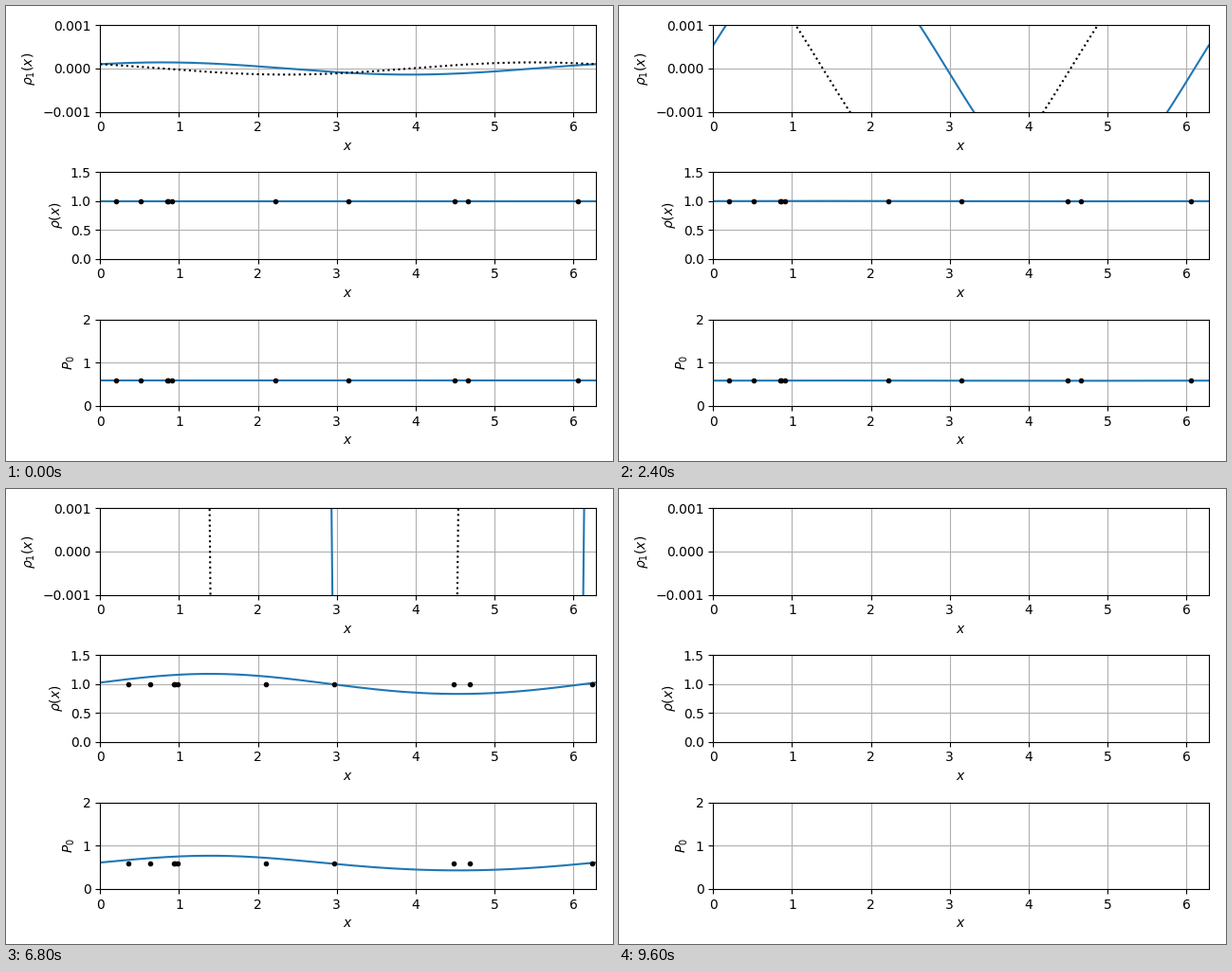
These frames come from a looping animation (640 by 480 pixels, 9700 ms). A matplotlib script:

```python
import numpy as np
import matplotlib.pyplot as plt
from matplotlib.animation import FuncAnimation

W, H, DPI = 640, 480, 100
FRAMES, INTERVAL = 97, 100
RATE = 0.925        # growth rate of the unstable mode
GAMMA = 5 / 3
P_REST = 0.583      # pressure at unit density
TAU = 2 * np.pi

x = np.linspace(0, TAU, 600)
angle = np.linspace(-4, 8, 4000)
start = np.array([0.201, 0.514, 0.848, 0.867, 0.909,
                  2.221, 3.149, 4.494, 4.664, 6.059])


def mode(t):
    """Amplitude and phase of the density wave at time t."""
    c, s = np.cosh(RATE * t), np.sinh(RATE * t)
    a, b = 1e-4 * (c + 0.15 * s), 1e-4 * (c + 5.4 * s)
    grown = np.hypot(a, b)
    return grown / np.sqrt(1 + 0.42 * grown**2), np.arctan2(b, a)


def wave(t):
    """Density perturbation and its slope."""
    e, phase = mode(t)
    e2 = 0.143 * e**2
    th = x - phase
    return (e * np.cos(th) + e2 * np.cos(2 * th),
            -e * np.sin(th) - 2 * e2 * np.sin(2 * th))


def tracers(t):
    """Tracer positions, carried along so that enclosed mass is kept."""
    e, phase = mode(t)
    d = 1.03 * e
    mass = angle + d * np.sin(angle) + 0.08 * d**2 * np.sin(2 * angle)
    return phase + np.interp(start - phase, np.maximum.accumulate(mass), angle)


fig, axes = plt.subplots(3, 1, figsize=(W / DPI, H / DPI), dpi=DPI)
fig.subplots_adjust(left=99.25 / W, right=621.8 / W, top=1 - 20.3 / H,
                    bottom=1 - 421.85 / H, hspace=0.7003)

panels = [
    (r"$\rho_1(x)$", [-0.001, 0, 0.001]),
    (r"$\rho(x)$", [0, 0.5, 1, 1.5]),
    (r"$P_0$", [0, 1, 2]),
]
for ax, (label, ticks) in zip(axes, panels):
    ax.set_xlim(0, TAU)
    ax.set_xticks(range(7))
    ax.set_yticks(ticks)
    ax.set_ylim(ticks[0], ticks[-1])
    ax.set_xlabel("$x$")
    ax.set_ylabel(label)
    ax.grid(True)

curves = [ax.plot([], [], color="C0")[0] for ax in axes]
slope_line, = axes[0].plot([], [], "k:")
dots = [ax.plot([], [], "k.")[0] for ax in axes[1:]]
artists = curves + [slope_line] + dots


def draw(i):
    # the run breaks down on its last step and leaves the panels empty
    if i == FRAMES - 1:
        for artist in artists:
            artist.set_data([], [])
        return artists
    t = i * INTERVAL / 1000
    delta, slope = wave(t)
    rho = np.maximum(1 + delta, 0)
    for line, y in zip(curves, (delta, rho, P_REST * rho**GAMMA)):
        line.set_data(x, y)
    slope_line.set_data(x, slope)
    pos = tracers(t)
    for dot, level in zip(dots, (1, P_REST)):
        dot.set_data(pos, np.full(pos.size, level))
    return artists


anim = FuncAnimation(fig, draw, frames=FRAMES, interval=INTERVAL,
                     repeat=True, repeat_delay=0)
plt.show()
```
